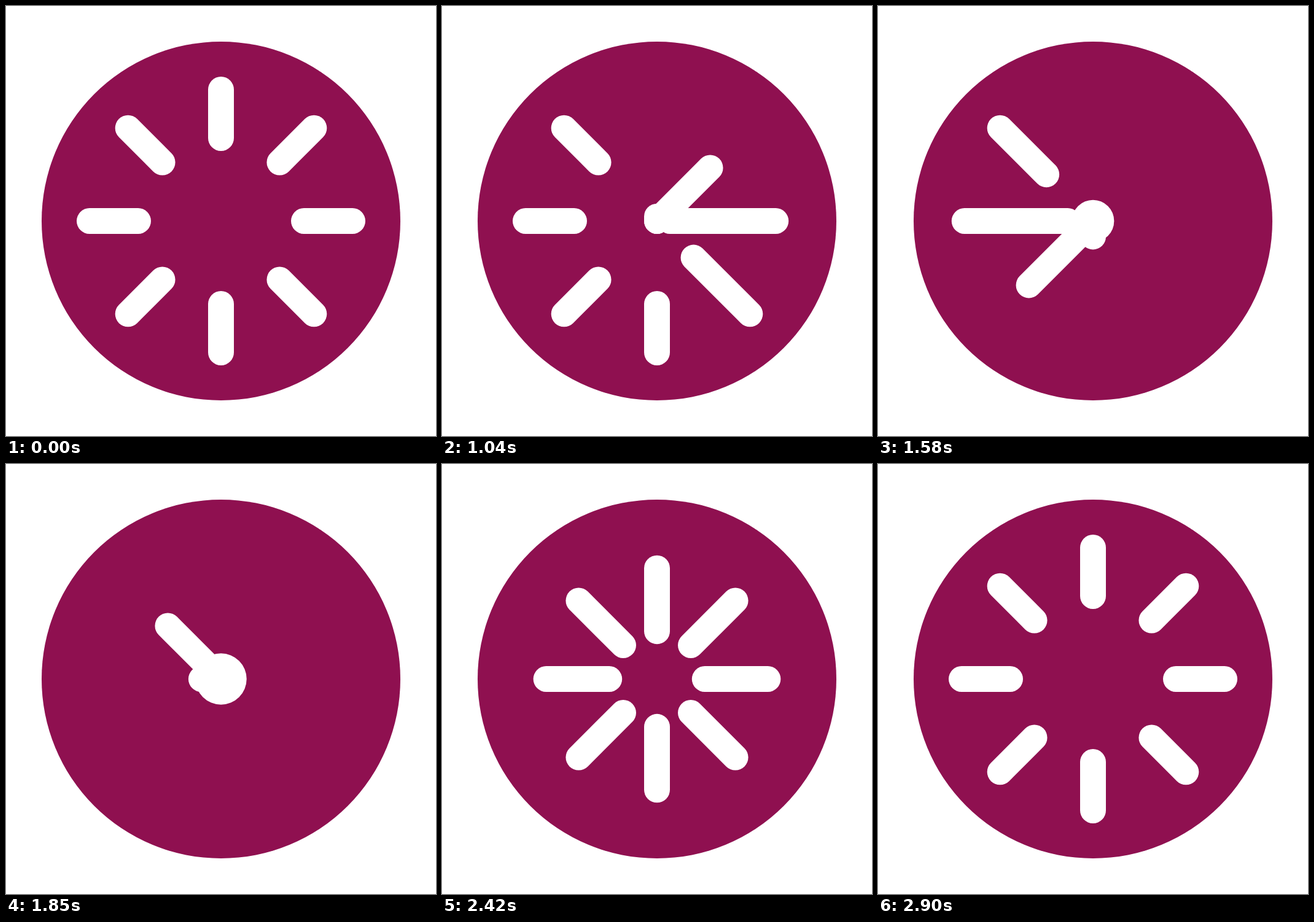
An HTML page that plays this animation: 700x700 px, repeating every 2.93 s.

```html
<!DOCTYPE html>
<html lang="en">
<head>
<meta charset="utf-8">
<title>Radial loader</title>
<style>
  html, body { margin: 0; width: 100%; height: 100%; overflow: hidden; background: #fff; }
  svg { display: block; width: 100vw; height: 100vh; }
  line { stroke: #fff; stroke-width: 42; stroke-linecap: round; }
</style>
</head>
<body>
<svg viewBox="-350 -350 700 700">
  <circle r="292" fill="#8f1050"/>
  <g id="rays"></g>
  <circle id="hub" r="0" fill="#fff"/>
</svg>
<script>
  const LOOP = 2930, HOLD = 530, STEP = 30;
  const INNER = 135, OUTER = 214;
  const BURST = 54, END = 79;

  // Start steps of each ray's inner and outer end, clockwise from the top.
  const innerStart = [-1, 3.2, 8, 12, 17.8, 24.6, 27.4, 31.5];
  const outerStart = [5, 10.9, 14.4, 18.4, 24.4, 30, 33.8, 37.9];
  const hubPath = [[18.5, 21], [26, 27], [44, 41.7], [53, 45], [55, 45], [60, 21]];

  const clamp = x => Math.min(1, Math.max(0, x));
  const smooth = x => x * x * (3 - 2 * x);
  const collapse = (n, start, span) => 1 - smooth(clamp((n - start) / span));
  const burst = (n, start) => 1 - Math.pow(1 - clamp((n - start) / (END - start)), 4.71);

  const rays = innerStart.map((_, k) => {
    const line = document.createElementNS("http://www.w3.org/2000/svg", "line");
    line.setAttribute("transform", `rotate(${k * 45})`);
    document.getElementById("rays").append(line);
    return line;
  });
  const hub = document.getElementById("hub");

  function hubRadius(n) {
    for (let i = 1; i < hubPath.length; i++) {
      const [a, ra] = hubPath[i - 1], [b, rb] = hubPath[i];
      if (n >= a && n < b) return ra + (rb - ra) * (n - a) / (b - a);
    }
    return 0;
  }

  function draw(now) {
    const n = Math.max(-1, Math.floor((now % LOOP - HOLD) / STEP));
    rays.forEach((ray, k) => {
      const inner = n < BURST ? collapse(n, innerStart[k], 12) : burst(n, 59.8);
      const outer = n < BURST ? collapse(n, outerStart[k], 13.5) : burst(n, 55.3);
      ray.setAttribute("y1", -INNER * inner);
      ray.setAttribute("y2", -OUTER * outer);
    });
    hub.setAttribute("r", hubRadius(n));
  }

  function tick() {
    draw(performance.now());
    requestAnimationFrame(tick);
  }
  tick();
</script>
</body>
</html>
```
